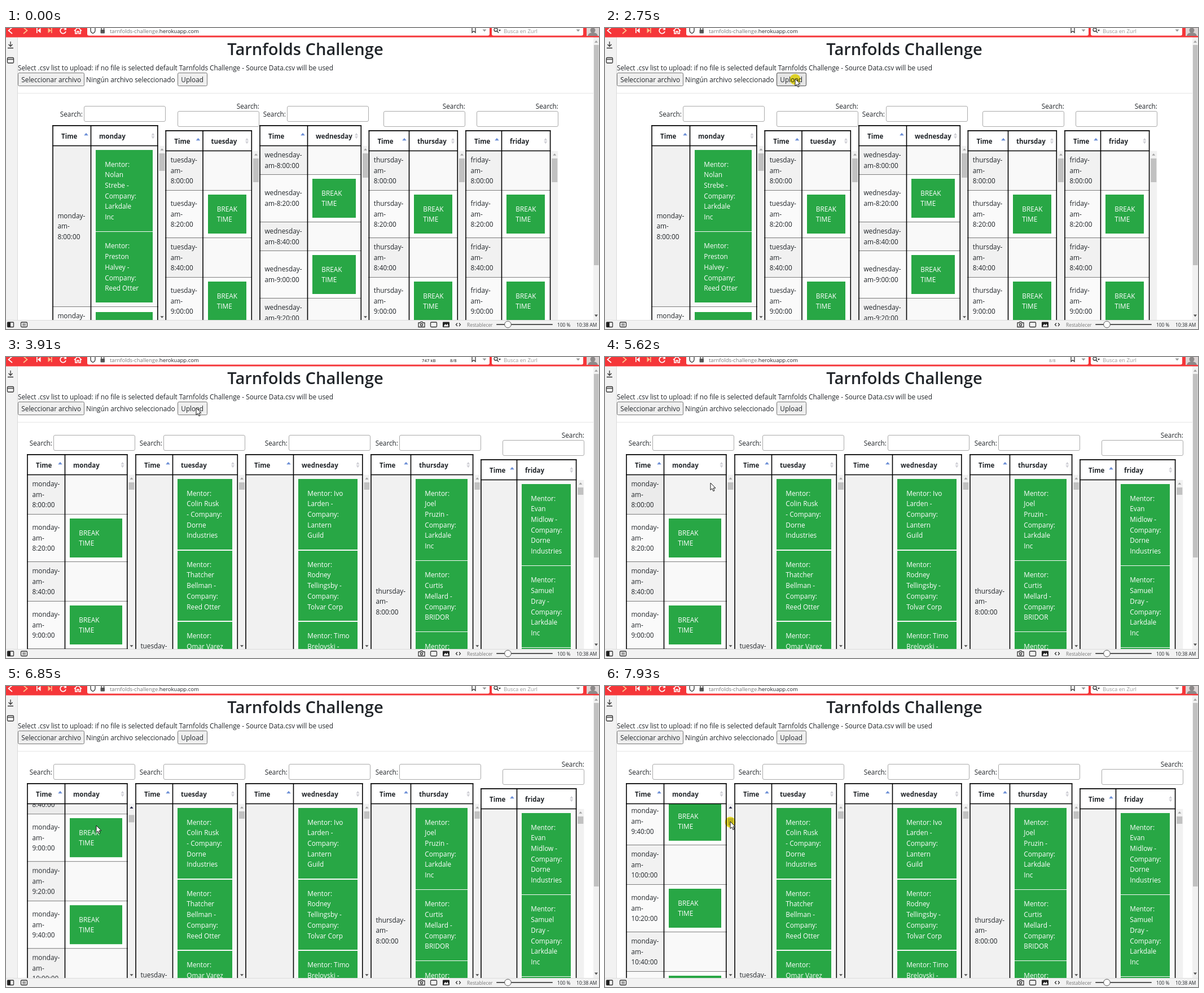
Recreate the animation shown at these times as an HTML page. Size 1051x533 px, loop 8000 ms.

```html
<!DOCTYPE html>
<html lang="es">
<head>
<meta charset="utf-8">
<title>Tarnfolds Challenge</title>
<style>
html, body { margin: 0; width: 100%; height: 100%; overflow: hidden; background: #fff; }
#stage { display: block; font: 11.8px "Open Sans", "Noto Sans", sans-serif; fill: #212529; }
text { white-space: pre; }
.bold { font-size: 11.5px; font-weight: 700; }
.title { font-size: 29.1px; font-weight: 600; }
.url { font-size: 9.5px; }
.small { font-size: 8.4px; }
.stat { font-size: 7.8px; fill: #111; }
.white { fill: #fff; }
.line { fill: none; stroke: #333; stroke-width: 1.3; }
.crisp { shape-rendering: crispEdges; }

.cut { animation: 8s step-end infinite; }
.move { animation: 8s linear infinite; }
.before { animation-name: before; }
.raw { animation-name: raw; }
.after { animation-name: after; }
.loading { animation-name: loading; }
.idle { animation-name: idle; }
.almost { animation-name: almost; }
.size { animation-name: size; }
.count { animation-name: count; }
.pressed { animation-name: pressed; }
.click { animation-name: click; mix-blend-mode: multiply; }
.cursor { animation-name: cursor; }
.rows { animation-name: rows; }
.thumb { animation-name: thumb; }
.scrolled { animation-name: scrolled; }
.hover0 { animation-name: hover0; }
.hover1 { animation-name: hover1; }
.hover2 { animation-name: hover2; }
.hover3 { animation-name: hover3; }

@keyframes before { 0% { opacity: 1 } 41%, 100% { opacity: 0 } }
@keyframes raw { 0% { opacity: 0 } 41% { opacity: 1 } 45%, 100% { opacity: 0 } }
@keyframes after { 0% { opacity: 0 } 45%, 100% { opacity: 1 } }
@keyframes loading { 0% { opacity: 0 } 39.125% { opacity: 1 } 47%, 100% { opacity: 0 } }
@keyframes idle { 0% { opacity: 1 } 39.125% { opacity: 0 } 47%, 100% { opacity: 1 } }
@keyframes almost { 0% { opacity: 0 } 47% { opacity: 1 } 48.875%, 100% { opacity: 0 } }
@keyframes size { 0%, 48.87% { opacity: 0 } 48.875%, 62% { opacity: 1 } 68%, 100% { opacity: 0 } }
@keyframes count { 0%, 48.87% { opacity: 0 } 48.875%, 67.5% { opacity: 1 } 70.25% { opacity: .5 } 73.25%, 100% { opacity: 0 } }
@keyframes pressed { 0% { opacity: 0 } 24.75% { opacity: 1 } 39.125%, 100% { opacity: 0 } }
@keyframes click { 0% { opacity: 0 } 34.375% { opacity: 1 } 36.25% { opacity: 0 } 99.1%, 100% { opacity: 1 } }
@keyframes scrolled { 0% { opacity: 0 } 72%, 100% { opacity: 1 } }
@keyframes hover0 { 0% { opacity: 0 } 67.8% { opacity: 1 } 72.3%, 100% { opacity: 0 } }
@keyframes hover1 { 0% { opacity: 0 } 72.3% { opacity: 1 } 79%, 100% { opacity: 0 } }
@keyframes hover2 { 0% { opacity: 0 } 79% { opacity: 1 } 87.6%, 100% { opacity: 0 } }
@keyframes hover3 { 0% { opacity: 0 } 87.6% { opacity: 1 } 91%, 100% { opacity: 0 } }
@keyframes cursor {
  0%, 3.6% { transform: translate(1012px, 540px) }
  3.625% { transform: translate(1004px, 522px) }
  13.25% { transform: translate(352px, 151px) }
  17.5% { transform: translate(300px, 112px) }
  20% { transform: translate(269px, 88px) }
  23.75% { transform: translate(308px, 70px) }
  24.75% { transform: translate(313px, 73px) }
  28.625%, 60.1% { transform: translate(337px, 90px) }
  68.375%, 70.9% { transform: translate(187px, 223px) }
  73.25%, 92.2% { transform: translate(160px, 247px) }
  94.375%, 95.8% { transform: translate(275px, 237px) }
  99.1%, 100% { transform: translate(222px, 240px) }
}
@keyframes rows {
  0%, 70.9% { transform: translateY(0) }
  73.25%, 76.5% { transform: translateY(-78px) }
  80.5%, 83% { transform: translateY(-156px) }
  85.625% { transform: translateY(-205.5px) }
  86.625%, 89.2% { transform: translateY(-233px) }
  91.5% { transform: translateY(-311px) }
  94%, 100% { transform: translateY(-389px) }
}
@keyframes thumb {
  0%, 70.9% { transform: translateY(0) }
  73.25%, 76.5% { transform: translateY(2.4px) }
  80.5%, 83% { transform: translateY(4.8px) }
  86.625%, 89.2% { transform: translateY(7px) }
  94%, 100% { transform: translateY(12px) }
}
</style>
</head>
<body>
<svg id="stage" width="1051" height="533" viewBox="0 0 1051 533"></svg>
<script>
const STEP = 18.7, FLOOR = 517;
const SITE = 'tarnfolds-challenge.', HOST = 'herokuapp.com';

// y is the middle of the capital letters
const text = (x, y, s, attrs = '') => `<text x="${x}" y="${y + 4.2}" ${attrs}>${s}</text>`;
const lines = (x, y, list, attrs) => list.map((s, i) => text(x, y + i * STEP, s, attrs)).join('');
const rect = (x, y, w, h, fill, attrs = '') =>
  `<rect x="${x}" y="${y}" width="${w}" height="${h}" fill="${fill}" ${attrs}/>`;
const path = (d, attrs = 'class="line"') => `<path d="${d}" ${attrs}/>`;
const group = (cls, ...parts) => `<g class="${cls}">${parts.join('')}</g>`;
const rule = (d, width, cls = '') => path(d, `fill="none" stroke="#000" stroke-width="${width}" class="${cls}"`);
const triangle = (x, y, r, h, fill, attrs = '') =>
  path(`M${x - r} ${y + h / 2}h${2 * r}l${-r} ${-h}z`, `fill="${fill}" ${attrs}`);

function cards(x, y, w, list) {
  return list.map(s => {
    const words = s.split('|'), h = words.length * STEP + 31.4;
    const out = rect(x, y, w, h, '#28a745', 'class="crisp"') + lines(x + 16, y + 25, words, 'class="white"');
    y += h + 1.3;
    return out;
  }).join('');
}

function timeLabel(day, i) {
  const m = 480 + 20 * i;
  const clock = `${Math.floor(m / 60)}:${String(m % 60).padStart(2, '0')}:00`;
  return day === 'wednesday' ? [day + '-', 'am-' + clock] : [day + '-', 'am-', clock];
}

function tableRows({ day, x, mid, end, rows, live }, y) {
  return rows.map(([h, list, pad = 7.8], i) => {
    const label = timeLabel(day, i), odd = i % 2;
    const out = rect(x, y, mid - x, h, odd ? '#fafafa' : '#f1f1f1')
      + rect(mid, y, end - mid, h, odd ? '#fff' : '#f9f9f9')
      + (live && i < 4 ? rect(x, y, end - x, h, '#000', `fill-opacity=".025" class="cut hover${i}"`) : '')
      + lines(x + 9.4, y + h / 2 - (label.length - 1) * STEP / 2, label)
      + cards(mid + 9.3, y + pad, end - mid - 19.2, list)
      + rule(`M${x} ${y + h}H${end}`, 1.2, 'crisp');
    y += h;
    return out;
  }).join('');
}

function searchBox({ end, top }) {
  const right = Math.round(end + 13.3), left = right - 145, low = top > 175;
  return text(low ? right : left - 2, low ? 138.5 : 152.5, 'Search:', 'text-anchor="end"')
    + rect(left + .5, low ? 147.5 : 138.5, 144, 27, '#fff', 'rx="2.5" stroke="#aaa"');
}

function table(t) {
  const { day, x, mid, end, top, thumb, live } = t;
  const body = top + 36.5, width = end - x + 14, bar = end + 1;
  const edges = y0 => [x + 1, mid + .5, end - .7].map(v => `M${v} ${y0}V${FLOOR}`).join('');
  return searchBox(t)
    + `<svg x="${x}" y="${body}" width="${width}" height="${FLOOR - body}" viewBox="${x} ${body} ${width} ${FLOOR - body}">`
    + group(live ? 'move rows' : '', tableRows(t, body))
    + rect(bar, body, 12, 320, '#f1f1f1')
    + rect(bar + 1, body + 13.5, 10, thumb, '#c1c1c1', live ? 'class="move thumb"' : '')
    + triangle(bar + 6, body + 6.5, 3, 3.5, '#a3a3a3')
    + (live ? triangle(bar + 6, body + 6.5, 3, 3.5, '#26264a', 'class="cut scrolled"') : '')
    + (top < 175 ? triangle(bar + 6, 512, 3, -3.5, '#505050') : '')
    + '</svg>'
    + rule(edges(top), 1.6)
    + rule(`M${x + .2} ${top + .8}H${end}M${x + .2} ${body}H${end}`, 1.7)
    + text(x + 16, top + 19.3, 'Time', 'class="bold"')
    + text(mid + 15, top + 19.3, day, 'class="bold"')
    + triangle(mid - 8, top + 16, 3.8, 4.6, '#6b8ed6')
    + triangle(end - 9, top + 16, 3, 4.6, '#d0d0d6')
    + triangle(end - 9, top + 22, 3, -4.6, '#d0d0d6');
}

function rawTable(day, x, mid, end, top, list, timeY) {
  const head = top + 27.3;
  return rect(x + .5, top + .5, end - x, 500, '#fff', 'stroke="#000" class="crisp"')
    + rule(`M${mid + .5} ${top}V${FLOOR}M${x} ${head}H${end}`, 1, 'crisp')
    + text(x + 4.8, top + 14.5, 'Time', 'class="bold"')
    + text(mid + 4.8, top + 14.5, day, 'class="bold"')
    + cards(mid + 5, head + 5.2, end - mid - 9.5, list)
    + text(x + 4.8, timeY, day + '-');
}

const BREAK = 'BREAK|TIME';
const grid = (n, h = 70) => Array.from({ length: n }, (_, i) => i % 2 ? [84, [BREAK]] : [h, []]);

const before = [
  { day: 'monday', x: 82, mid: 150, end: 269.5, top: 172, thumb: 31, rows: [
    [285, ['Mentor:|Nolan|Strebe -|Company:|Larkdale|Inc', 'Mentor:|Preston|Halvey -|Company:|Reed Otter']],
    [70, [BREAK], 9.5]] },
  { day: 'tuesday', x: 282.3, mid: 348.5, end: 436, top: 181, thumb: 42, rows: grid(4) },
  { day: 'wednesday', x: 449, mid: 534, end: 630, top: 172, thumb: 43, rows: grid(5, 51) },
  { day: 'thursday', x: 642.4, mid: 714, end: 801, top: 181, thumb: 42, rows: grid(4) },
  { day: 'friday', x: 814, mid: 878, end: 965.3, top: 181, thumb: 42, rows: grid(4) }
];

const guild = 'Mentor: Ivo|Larden -|Company:|Lantern|Guild';
const tolvar = 'Mentor:|Rodney|Tellingsby -|Company:|Tolvar Corp';
const timo = 'Mentor: Timo|Brelovski -|Company:|Reed Otter';

const after = [
  { day: 'monday', x: 37, mid: 104, end: 215.5, top: 172, thumb: 13, live: true, rows: grid(12) },
  { day: 'tuesday', x: 229, mid: 295, end: 411, top: 172, thumb: 13, rows: [
    [644, ['Mentor:|Colin Rusk|- Company:|Dorne|Industries', 'Mentor:|Thatcher|Bellman -|Company:|Reed Otter',
      'Mentor:|Omar Varez|- Company:']]] },
  { day: 'wednesday', x: 424, mid: 509, end: 632.5, top: 172, thumb: 13, rows: [[900, [guild, tolvar, timo]]] },
  { day: 'thursday', x: 646, mid: 717, end: 828.3, top: 172, thumb: 13, rows: [
    [449, ['Mentor:|Joel|Pruzin -|Company:|Larkdale|Inc', 'Mentor:|Curtis|Mellard -|Company:|BRIDOR',
      'Mentor:|Curtis']]] },
  { day: 'friday', x: 841, mid: 905, end: 1011.3, top: 181, thumb: 13, rows: [
    [900, ['Mentor:|Evan|Midlow -|Company:|Dorne|Industries', 'Mentor:|Samuel|Dray -|Company:|Larkdale|Inc',
      'Mentor:|Evan']]] }
];

const pageThumb = h => rect(1042, 30, 8.5, h, '#c1c1c1');
const button = (x, w, s, bg = '#efefef', edge = '#767676') =>
  rect(x + .5, 79.5, w, 23, bg, `rx="2" stroke="${edge}"`) + text(x + 6.3, 91.5, s);

function page() {
  return rect(1041, 16, 10, 501, '#f1f1f1')
    + triangle(1046, 24, 3, 4, '#a3a3a3') + triangle(1046, 509.5, 3, -4, '#505050')
    + text(530.5, 43.8, 'Tarnfolds Challenge', 'class="title" text-anchor="middle"')
    + text(21, 70.5, 'Select .csv list to upload: if no file is selected default Tarnfolds Challenge - Source Data.csv will be used')
    + button(21, 117, 'Seleccionar archivo')
    + text(142, 91.5, 'Ningún archivo seleccionado')
    + button(304, 52, 'Upload')
    + group('cut pressed', button(304, 52, 'Upload', '#e5e5e5', '#4c4c4c'))
    + rect(21, 115, 1020, 1, '#e5e5e5')
    + group('cut before', before.map(table).join(''), pageThumb(390))
    + group('cut raw',
      rawTable('wednesday', 541, 617, 736.5, 144, [guild, tolvar, timo], 508),
      rawTable('tuesday', 327.5, 384.5, 508.5, 253.7,
        ['Mentor: Colin|Rusk -|Company:|Dorne|Industries', 'Mentor:|Thatcher|Bellman -|Company: Reed|Otter'], 700),
      pageThumb(23.5))
    + group('cut after', after.map(table).join(''), pageThumb(325));
}

function toolbar() {
  const stroke = c => `fill="none" stroke="${c}" stroke-width="1.7"`;
  const pale = '#ffc08a';
  return rect(0, 0, 1051, 16.5, '#f53639')
    + path('M11 -1L4.500 4.500L11 10', stroke('#fff')) + path('M31 -1L37.500 4.500L31 10', stroke(pale))
    + rect(54, 0, 1.6, 9, '#fff') + path('M61.500 0V9L56 4.500Z', 'fill="#fff"')
    + rect(80, 0, 1.6, 9, pale) + path('M74.500 0V9L80 4.500Z', `fill="${pale}"`)
    + group('cut idle', path('M105 1.500A5 5 0 1 0 106 6', stroke('#fff')), path('M102 3.500H107V-1Z', 'fill="#fff"'))
    + group('cut loading', path('M97 0L105.500 9M105.500 0L97 9', stroke('#fff')))
    + path('M121 5L127.500 -1L134 5M123 4V10H126V6H129V10H132V4', stroke('#fff'))
    + rect(144, -5, 713, 18.5, '#fff', 'rx="3"') + rect(861, -5, 162, 18.5, '#fff', 'rx="3"')
    + path('M150 -1V4Q150 8 154 9.500Q158 8 158 4V-1')
    + rect(167.5, 3, 7.5, 6.5, '#555', 'rx="1"') + path('M169 3.500V1A2.300 2.300 0 0 1 173.600 1V3.500')
    + `<text x="184" y="8.500" class="url"><tspan fill="#777">${SITE}</tspan>${HOST}</text>`
    + path('M826 -1V8L829 5.500L832 8V-1') + triangle(848, 4.5, 3.5, -4, '#999')
    + `<circle cx="868" cy="3" r="3" class="line"/>` + path('M870 5L873 8.500') + triangle(875, 4.5, 2.2, -3, '#444')
    + text(882, 5, 'Busca en Zurl', 'class="url" style="fill:#999"') + triangle(1014, 4.5, 3.5, -4, '#999')
    + rect(1029, 0, 22, 14, '#ddd6d6') + path('M1031 14Q1032 8 1040 8Q1048 8 1049 14Z', 'fill="#8d8989"')
    + '<circle cx="1040" cy="4" r="4.500" fill="#8d8989"/>'
    + group('cut loading', text(736, 4.3, '0 bytes', 'class="stat"'), text(787, 4.3, '0/0', 'class="stat"'))
    + group('cut almost', text(737, 4.3, '712 kB', 'class="stat"'), text(787, 4.3, '7/8', 'class="stat"'))
    + group('move size', text(737, 4.3, '747 kB', 'class="stat"'))
    + group('move count', text(787, 4.3, '8/8', 'class="stat"'));
}

function sidebar() {
  return rect(0, 16.5, 20.5, 501, '#f2f2f2') + rect(20, 16.5, 1, 501, '#dadada')
    + path('M8 24V32M4.500 29L8 32.500L11.500 29M3 35.500H13')
    + rect(2.5, 52.5, 11, 9.5, 'none', 'rx="1.5" class="line"') + path('M2.500 55.500H13.500');
}

function statusBar() {
  return rect(0, 517, 1051, 16, '#f2f2f2') + rect(0, 517, 1051, 1, '#dcdcdc')
    + rect(2.5, 521, 11, 8.5, 'none', 'rx="1" class="line"') + rect(3, 521, 5, 8.5, '#222')
    + rect(26.5, 521, 11, 8.5, 'none', 'rx="1.5" class="line"') + path('M30.500 523V527.500M33.500 523V527.500')
    + group('cut loading', text(48, 524.3, `Esperando a ${SITE}${HOST}...`, 'class="small"'))
    + path('M731 522H734L735 520.500H738L739 522H742V529.500H731Z')
    + '<circle cx="736.500" cy="525.500" r="2" class="line"/>'
    + rect(752.5, 521, 11, 8.5, 'none', 'rx="1.5" class="line"')
    + rect(774, 520.5, 12, 9.5, '#222', 'rx="1"') + path('M775.500 528.500L778.500 524L780.500 526.500L782.500 523.500L784.500 528.500Z', 'fill="#fff"')
    + path('M800 522.500L797.500 525.300L800 528M803 522.500L805.500 525.300L803 528')
    + text(817, 524.8, 'Restablecer', 'class="small" style="fill:#777"')
    + rect(869, 524, 100, 2, '#555', 'rx="1"')
    + '<circle cx="889.500" cy="525" r="5.800" fill="#fff" stroke="#555"/>'
    + text(977, 524.8, '100 %', 'class="small"') + text(1011, 524.8, '10:38 AM', 'class="small"');
}

const pointer = group('move cursor',
  '<circle cx="0" cy="1" r="9.500" fill="#f7e92c" class="cut click"/>',
  path('M0 0V12.500L2.900 9.900L4.900 14.500L7 13.600L5 9.100H8.900Z', 'fill="#fff" stroke="#111" stroke-width="1"'));

document.getElementById('stage').innerHTML =
  rect(0, 0, 1051, 533, '#fff') + page() + sidebar() + toolbar() + statusBar() + pointer;
</script>
</body>
</html>
```
